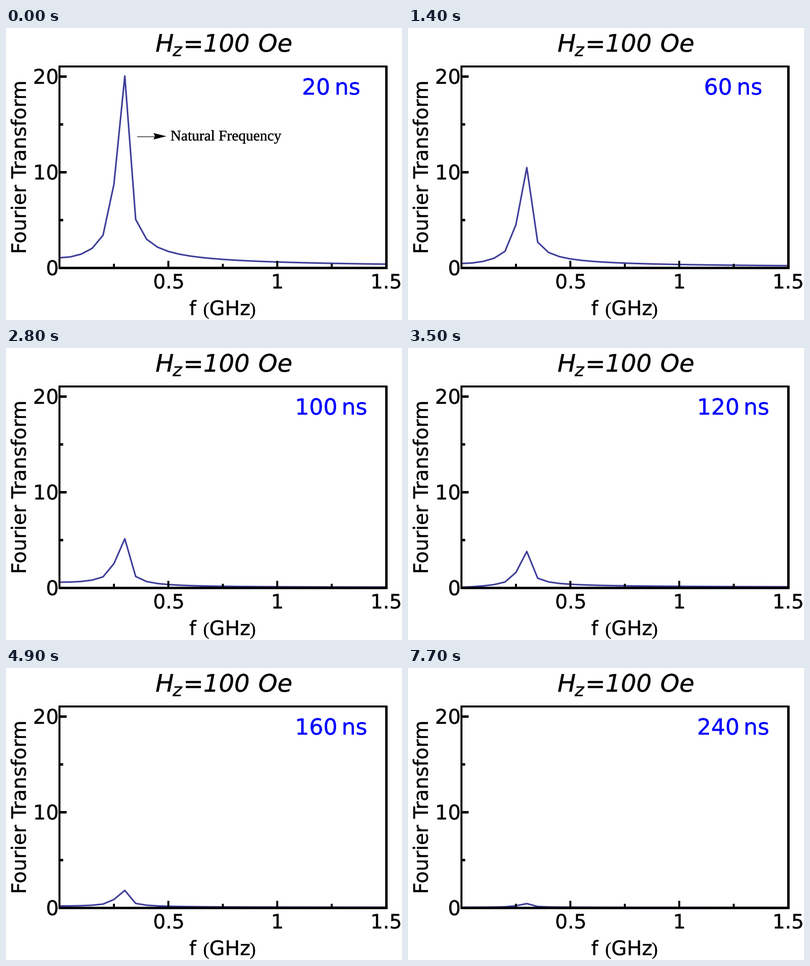
These frames come from a looping animation (800x592 px, 8 s). A matplotlib script:

```python
import numpy as np
import matplotlib.pyplot as plt
from matplotlib.animation import FuncAnimation
from matplotlib.patches import PathPatch, Polygon
from matplotlib.textpath import TextPath
from matplotlib.transforms import Affine2D

W, H, DPI = 800, 592, 80
PX = 72 / DPI                      # one pixel in points
INTERVAL, FRAMES, HOLD = 100, 80, 7
LEFT, RIGHT, TOP, BOTTOM = 108, 767.5, 78, 485.5
SANS, SERIF = "DejaVu Sans", "Liberation Serif"
BLUE = "#0000ff"

fig = plt.figure(figsize=(W / DPI, H / DPI), dpi=DPI, facecolor="white")
ax = fig.add_axes([0, 0, 1, 1])
ax.set_xlim(0, W)
ax.set_ylim(H, 0)
ax.axis("off")


def px(f):
    return LEFT + 440 * f


def py(v):
    return BOTTOM - 19.4 * v


def glyphs(s, x, y, size, anchor="l", family=SANS, style="normal", rot=0):
    """Text outline; anchor 'o' = pen origin, 'l'/'c'/'r' = ink edge or middle."""
    path = TextPath((0, 0), s, size=size, prop={"family": family, "style": style})
    box = path.get_extents()
    dx = {"o": 0, "l": box.x0, "c": (box.x0 + box.x1) / 2, "r": box.x1}[anchor]
    move = Affine2D().translate(-dx, 0).rotate_deg(rot).scale(1, -1).translate(x, y)
    return move.transform_path(path)


def put(s, x, y, size, anchor="l", color="black", **kw):
    patch = PathPatch(glyphs(s, x, y, size, anchor, **kw), fc=color, ec=color,
                      lw=0.5 * PX, zorder=4)
    return ax.add_patch(patch)


def bar(xs, ys, width=4):
    ax.plot(xs, ys, color="black", lw=width * PX, solid_capstyle="butt", zorder=3)


# Frame and ticks
bar([LEFT] * 2, [TOP - 2, BOTTOM + 2.5])
bar([LEFT - 2, RIGHT + 2.5], [TOP] * 2)
bar([RIGHT] * 2, [TOP - 2, BOTTOM + 2.5], 5)
bar([LEFT - 2, RIGHT + 2.5], [BOTTOM] * 2, 5)
for v in (5, 10, 15, 20):
    bar([LEFT, LEFT + (7 if v % 10 else 14)], [py(v)] * 2, 5)
for n in range(1, 6):
    bar([px(n / 4)] * 2, [BOTTOM, BOTTOM - (8 if n % 2 else 14)])

# Labels
for v in (0, 10, 20):
    put(str(v), 104, py(v) + 15.5, 41, "r")
for s, x in (("0.5", 328.5), ("1", 548.5), ("1.5", 768.5)):
    put(s, x, 528, 40, "c")
put("Fourier Transform", 40, 282, 40, "c", rot=90)
put("f", 371, 582, 40)
put("(", 400, 582, 37, family=SERIF)
put("GHz", 452.5, 582, 40.5, "c")
put(")", 503, 582, 37, "r", family=SERIF)

for s, x, y, size in (("H", 320.5, 48, 49), ("z", 346.5, 57, 36), ("=", 378, 48, 48),
                      ("100", 445.5, 48, 49), ("Oe", 544, 48, 49)):
    put(s, x, y, size, "c", style="oblique")

# Annotation shown with the first spectrum only
note = [
    put("Natural Frequency", 333, 228, 30, family=SERIF),
    ax.plot([265, 302], [219.5] * 2, color="black", lw=1.2 * PX)[0],
    ax.add_patch(Polygon([(324, 219.5), (298, 213), (301, 219.5), (298, 226)],
                         fc="black", lw=0)),
]

freq = np.arange(0, 1.501, 0.05)
curve, = ax.plot([], [], color="#3f3d99", lw=3.2 * PX, zorder=2)
number = put("20", 597.8, 135, 45, "o", color=BLUE)
unit = put("ns", 668, 135, 45, color=BLUE)


def spectrum(k):
    """Fourier magnitude of a damped oscillation in the k-th 20 ns window."""
    f0, damp = 0.2845, 0.0028
    amp = np.exp(-0.452 - 0.3215 * k - 0.003 * k * k)
    phase = np.radians(-27 + 114 * k)
    top = np.hypot(f0 * np.sin(phase), freq * np.cos(phase))
    return amp * (1 - 0.08 * freq) * top / np.abs(f0**2 - freq**2 + 2j * damp * freq)


def update(i):
    k = i // HOLD
    ns = 20 * (k + 1)
    shift = 14 if ns >= 100 else 0
    curve.set_data(px(freq), py(spectrum(k)))
    number.set_path(glyphs(str(ns), 597.8 - shift, 135, 45, "o"))
    unit.set_path(glyphs("ns", 668 + shift, 135, 45))
    for part in note:
        part.set_visible(k == 0)
    return [curve, number, unit, *note]


anim = FuncAnimation(fig, update, frames=FRAMES, interval=INTERVAL,
                     repeat=True, repeat_delay=0, blit=False)
plt.show()
```
